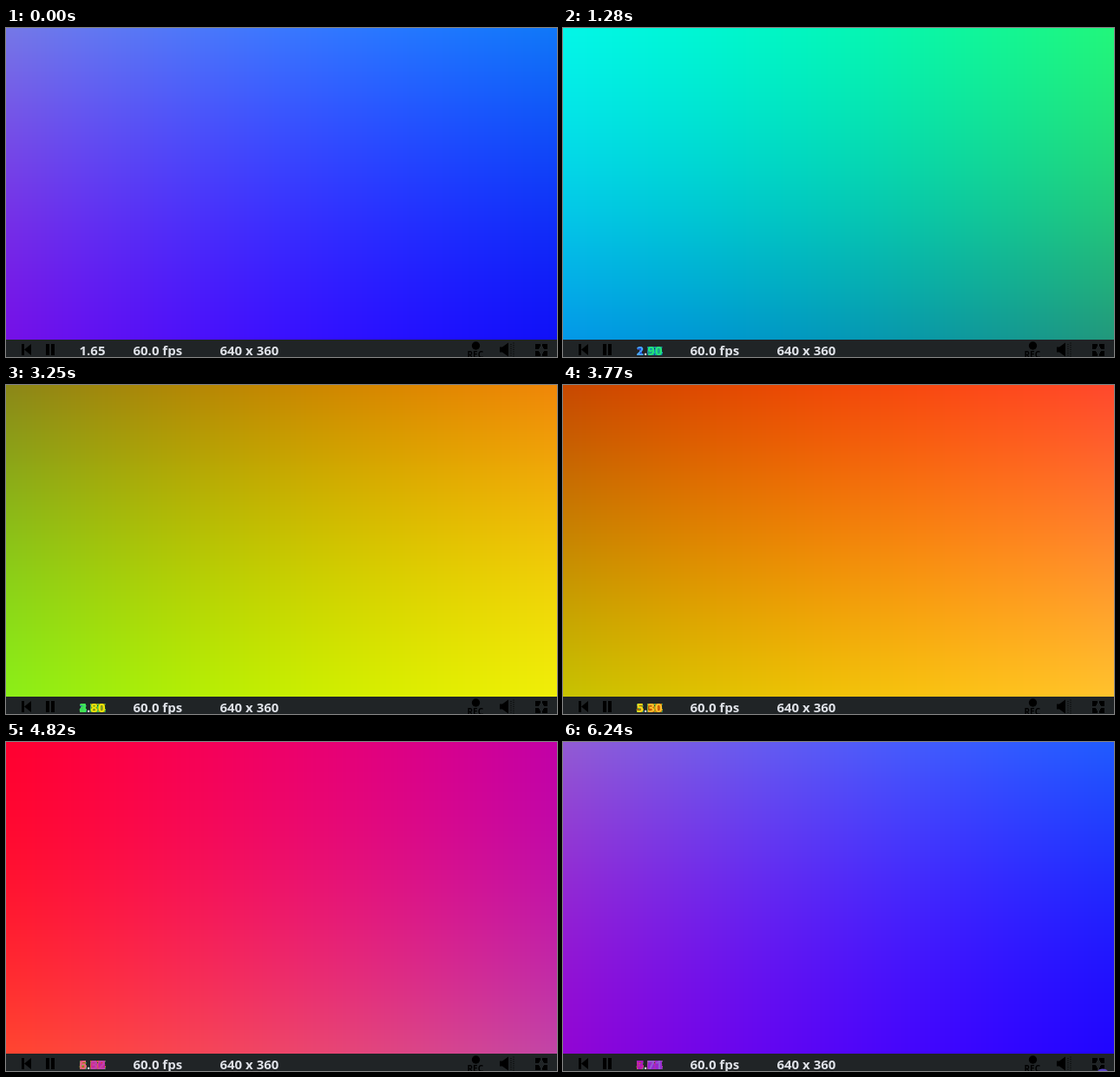
Write an HTML page with a canvas that moves like this. It is 635 px wide and 379 px high and loops after 6.31 s.

```html
<!DOCTYPE html>
<html lang="en">
<head>
<meta charset="utf-8">
<title>Colour cycle player</title>
<style>
  html, body { margin: 0; width: 100%; height: 100%; overflow: hidden; background: #202426; }
  canvas, svg { position: absolute; left: 0; top: 0; display: block; }
  text { font: bold 15px "Open Sans", "Noto Sans", sans-serif; fill: #dfe2e8; }
  .rec { font-size: 10px; fill: #000; }
</style>
</head>
<body>
<canvas id="view" width="635" height="379"></canvas>
<svg width="635" height="379" viewBox="0 0 635 379">
  <g shape-rendering="crispEdges">
    <path d="M18 364h3v13h-3zM46 364h4v13h-4zM52 364h4v13h-4z"/>
    <path d="M610 364h6v3h-2v3h-4zM624 364h-6v3h2v3h4zM610 378h6v-3h-2v-3h-4zM624 378h-6v-3h2v-3h4z"/>
    <path d="M611 365h4v4h-4zM619 365h4v4h-4zM611 373h4v4h-4zM619 373h4v4h-4z"/>
  </g>
  <path d="M29 364v13l-8-6.5zM569 367.5h3l7-5v16l-7-5h-3z"/>
  <path d="M582 364v14M585 362.500v16" stroke="#000" stroke-dasharray="1 1.500" fill="none"/>
  <circle cx="541.500" cy="366" r="4.700"/>
  <text class="rec" x="531.500" y="380">REC</text>
  <text x="146.500" y="377">60.0 fps</text>
  <text x="246.500" y="377">640 x 360</text>
  <ellipse id="spot" cx="622" cy="380" rx="6" ry="3.500" fill="#5a46c8" visibility="hidden"/>
</svg>
<script>
const LOOP = 6310, W = 635, H = 359;
const BAR = [32, 36, 38], INK = [223, 226, 232];
const ctx = document.getElementById("view").getContext("2d");
const spot = document.getElementById("spot");

// Runs of picture changes: first ms, last ms, count
const runs = [
  [0, 0, 1], [60, 630, 10], [700, 1280, 10], [1350, 1940, 10],
  [2010, 2520, 9], [2590, 2590, 1], [2660, 3250, 10], [3320, 3950, 11],
  [4020, 4230, 4], [4280, 4630, 6], [4680, 4820, 3], [4890, 5260, 7],
  [5330, 5910, 10], [5980, 6240, 5]
];
const starts = runs.flatMap(([a, b, n]) => Array.from({ length: n }, (_, i) =>
  Math.round((a + (b - a) * i / Math.max(1, n - 1)) / 10) * 10));

// Shader clock: step, seconds
const clock = [[0, 1.65], [20, 2.9], [39, 4.1], [50, 4.8], [65, 5.74], [74, 6.32], [96, 7.71]];
function seconds(step) {
  const i = Math.max(1, clock.findIndex(c => c[0] >= step));
  const [a, s] = clock[i - 1], [b, e] = clock[i];
  return s + (e - s) * (step - a) / (b - a);
}

const wave = v => Math.round(255 * (0.5 + 0.5 * Math.cos(v)));
const shade = (t, u, v) => [wave(t + u), wave(t + v + 2), wave(t + u + 4)];
const rgb = c => `rgb(${c.join()})`;

// Gradient colour closest to the wanted one
function nearest(t, want) {
  let best, least = Infinity;
  for (let k = 0; k < 81; k++) {
    const c = shade(t, k % 9 / 8, Math.floor(k / 9) / 8);
    const d = c.reduce((sum, x, i) => sum + (x - want[i]) ** 2, 0);
    if (d < least) { least = d; best = c; }
  }
  return rgb(best);
}

const frames = starts.map((_, i) => {
  const t = seconds(i);
  return {
    t,
    label: t.toFixed(2),
    light: i ? nearest(t, INK) : rgb(INK),
    dark: nearest(t, BAR)
  };
});

function paintSky(t) {
  ctx.globalCompositeOperation = "source-over";
  for (let x = 0; x < W; x++) {
    const [r, , b] = shade(t, (x + 0.5) / 640, 0);
    ctx.fillStyle = rgb([r, 0, b]);
    ctx.fillRect(x, 0, 1, H);
  }
  ctx.globalCompositeOperation = "lighter";
  for (let y = 0; y < H; y++) {
    ctx.fillStyle = rgb([0, shade(t, 0, 1 - (y + 0.5) / 360)[1], 0]);
    ctx.fillRect(0, y, W, 1);
  }
  ctx.globalCompositeOperation = "source-over";
}

// Digits take the colours of the moment they changed and leave ghosts
function paintTimer(step) {
  ctx.font = 'bold 15px "Open Sans", "Noto Sans", sans-serif';
  const digit = ctx.measureText("0").width, dot = ctx.measureText(".").width;
  const xs = [0, digit, digit + dot, 2 * digit + dot].map(x => x + 84.5);
  let last = "";
  for (const f of frames.slice(0, step + 1)) {
    xs.forEach((x, i) => {
      if (f.label[i] === last[i]) return;
      if (last) {
        ctx.fillStyle = f.dark;
        ctx.fillText(last[i], x, 377);
      }
      ctx.fillStyle = f.light;
      ctx.fillText(f.label[i], x, 377);
    });
    last = f.label;
  }
}

const origin = performance.now();
let shown = -1;
function draw() {
  const now = (performance.now() - origin) % LOOP;
  const step = starts.filter(s => s <= now).length - 1;
  if (step !== shown) {
    shown = step;
    paintSky(frames[step].t);
    ctx.fillStyle = rgb(BAR);
    ctx.fillRect(0, H, W, 20);
    paintTimer(step);
    spot.setAttribute("visibility", step === starts.length - 1 ? "visible" : "hidden");
  }
  requestAnimationFrame(draw);
}
draw();
</script>
</body>
</html>
```
